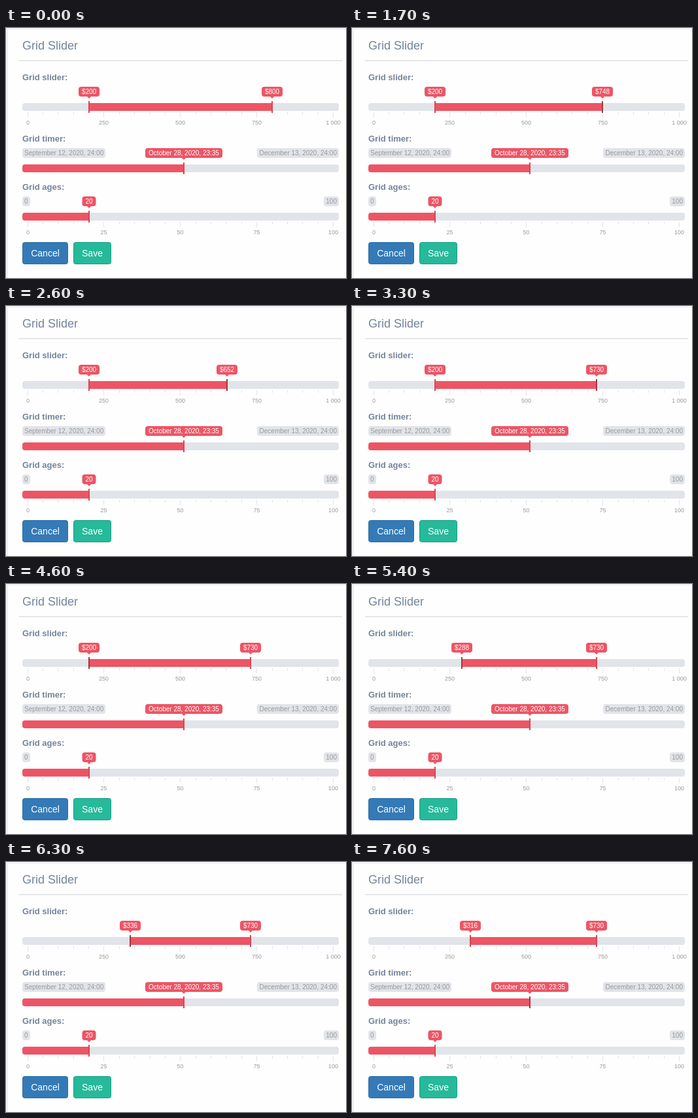
Animation of 520 by 383 pixels, one loop 8 s. Source, as an HTML page:

```html
<!DOCTYPE html>
<html lang="en">
<head>
<meta charset="utf-8">
<title>Grid Slider</title>
<style>
  html, body { margin: 0; width: 100%; height: 100%; overflow: hidden; background: #fff; }
  svg { display: block; font-family: Arial, "Liberation Sans", sans-serif; }
</style>
</head>
<body>
<svg id="stage" width="520" height="383" viewBox="0 0 520 383"></svg>
<script>
const GREY = '#e1e4e9', RED = '#ed5565', HANDLE = '#da4453', HELD = '#a43540';
const LOOP = 8000, STEP = 100;
const stage = document.getElementById('stage');

function add(parent, tag, attrs, text) {
  const el = document.createElementNS('http://www.w3.org/2000/svg', tag);
  for (const key in attrs) el.setAttribute(key, attrs[key]);
  if (text !== undefined) el.textContent = text;
  parent.append(el);
  return el;
}
const box = (x, y, width, height, fill, rx = 0, parent = stage) =>
  add(parent, 'rect', { x, y, width, height, fill, rx });
const label = (x, y, size, fill, text, anchor = 'start', parent = stage) =>
  add(parent, 'text', { x, y, 'font-size': size, fill, 'text-anchor': anchor }, text);

const toX = value => Math.round(33 + value * 0.4675);

function heading(y, text) {
  label(25, y, 13, '#73849a', text).setAttribute('font-weight', 'bold');
}

// Grey rounded track with a red bar whose left end is rounded too.
function track(y, barEnd) {
  box(25, y, 484, 12, GREY, 4);
  if (barEnd) add(stage, 'path', {
    d: `M${barEnd} ${y}H29q-4 0-4 4v4q0 4 4 4H${barEnd}z`, fill: RED
  });
}

function grid(y, names) {
  for (let i = 0; i <= 20; i++) {
    const x = Math.round(32.5 + i * 23.375);
    box(x, y, 1, i % 5 ? 4 : 8, GREY);
    if (i % 5 === 0) label(x + 0.5, y + 19, 9, '#999', names[i / 5], 'middle');
  }
}

// Handle line with its red tip; y is the top of the tip.
function handle(y, width, text) {
  const g = add(stage, 'g', {});
  const line = box(-1, y + 22, 2, 18, HANDLE, 0, g);
  box(-width / 2, y, width, 15, RED, 4, g);
  add(g, 'path', { d: `M-3 ${y + 15}h6l-3 3z`, fill: RED });
  const tip = label(0, y + 11, 10, '#fff', text, 'middle', g);
  return {
    move(x) { g.setAttribute('transform', `translate(${x} 0)`); return this; },
    say(t) { tip.textContent = t; },
    hold(on) { line.setAttribute('fill', on ? HELD : HANDLE); }
  };
}

function limits(y, low, lowWidth, high, highWidth) {
  box(25, y, lowWidth, 15, GREY, 4);
  label(28, y + 11, 10, '#999', low);
  box(509 - highWidth, y, highWidth, 15, GREY, 4);
  label(506, y + 11, 10, '#999', high, 'end');
}

function button(x, width, fill, stroke, text) {
  add(stage, 'rect', { x: x + 0.5, y: 328.5, width: width - 1, height: 33, rx: 3, fill, stroke });
  label(x + width / 2, 350, 14, '#fff', text, 'middle');
}

box(0, 0, 520, 383, '#fefefe');
box(0, 0, 2, 383, '#f5f5f6');
box(2, 1, 518, 1, '#e7eaec');
box(2, 1, 1, 382, '#e7eaec');
label(25, 33, 18, '#73849a', 'Grid Slider');
box(20, 49, 494, 2, '#e4e6e9');

heading(80, 'Grid slider:');
track(115);
const bar = box(127, 115, 280, 12, RED);
grid(129, ['0', '250', '500', '750', '1 000']);
const from = handle(90, 32, '$200');
const to = handle(90, 32, '$800');

heading(174, 'Grid timer:');
limits(184, 'September 12, 2020, 24:00', 127, 'December 13, 2020, 24:00', 125);
track(209, 272);
const timer = handle(184, 118, 'October 28, 2020, 23:35').move(272);

heading(248, 'Grid ages:');
limits(258, '0', 12, '100', 23);
track(283, 127);
grid(297, ['0', '25', '50', '75', '100']);
handle(258, 21, '20').move(127);

button(25, 70, '#337ab7', '#2e6da4', 'Cancel');
button(103, 58, '#26b99a', '#169f85', 'Save');

// Drags: start time, then one value per step.
const fromDrags = [
  [5300, 238, 288, 342, 384, 406],
  [6100, 390, 362, 336, 326, 320, 318, 316]
];
const toDrags = [
  [1700, 748, 722, 694, 668, 648, 636, 632],
  [2600, 652, 682, 712, 730]
];

function valueAt(t, start, drags) {
  let value = start;
  for (const [begin, ...values] of drags)
    if (t >= begin) value = values[Math.min(values.length - 1, Math.floor((t - begin) / STEP))];
  return value;
}

const within = (t, a, b) => t >= a && t < b;

function draw(t) {
  const low = valueAt(t, 200, fromDrags), high = valueAt(t, 800, toDrags);
  const x1 = toX(low), x2 = toX(high);
  bar.setAttribute('x', x1);
  bar.setAttribute('width', x2 - x1);
  from.move(x1).say('$' + low);
  to.move(x2).say('$' + high);
  to.hold(within(t, 900, 3600));
  from.hold(within(t, 4600, 7000));
  timer.hold(within(t, 7100, 7200) || t >= 7600);
}

const began = performance.now();
function tick() {
  draw((performance.now() - began) % LOOP);
  requestAnimationFrame(tick);
}
tick();
</script>
</body>
</html>
```
